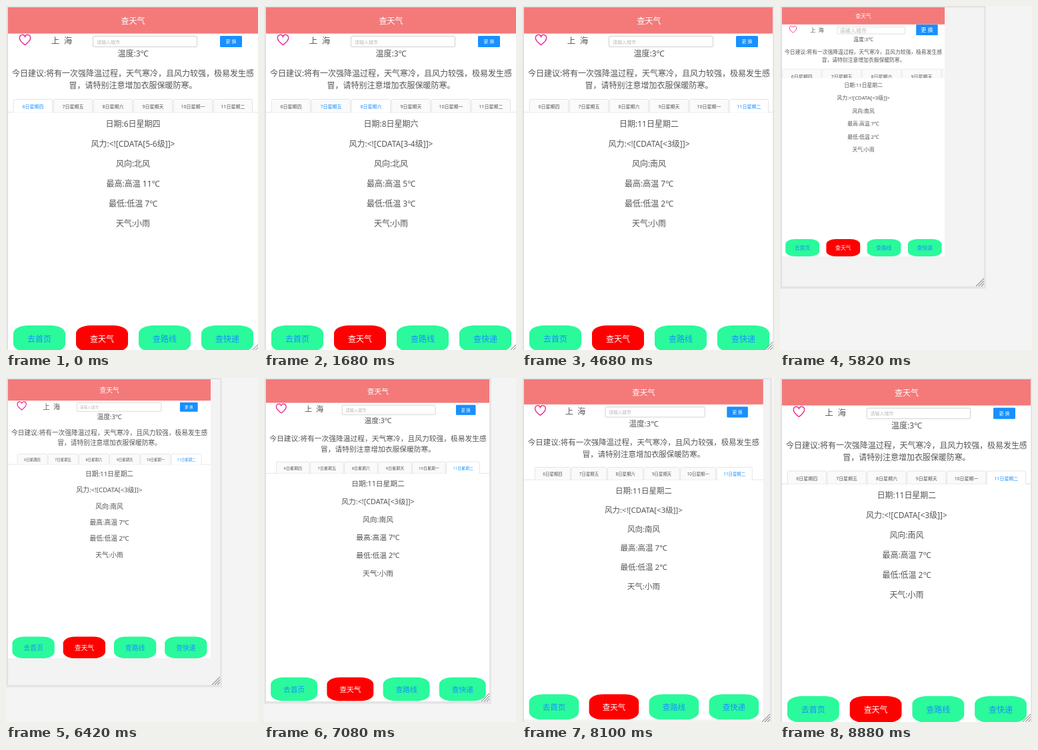
These frames come from a looping animation (378 by 518 pixels, 9.54 s). An HTML page:

```html
<!DOCTYPE html>
<html lang="zh-CN">
<head>
<meta charset="utf-8">
<title>查天气</title>
<style>
  html, body { margin: 0; width: 100%; height: 100%; overflow: hidden; background: #f4f4f4; }
  svg { display: block; }
  text { font-family: 'Noto Sans', 'Noto Sans CJK SC', 'Noto Sans CJK', sans-serif; white-space: pre; }
</style>
</head>
<body>
<svg id="stage" width="378" height="518" viewBox="0 0 378 518"></svg>
<script>
const LOOP = 9540, STEP = 60, FADE = 300;
const INK = '#555', BLUE = '#1890ff';
const stage = document.getElementById('stage');

const days = [
  { name: '6日星期四', wind: '5-6级', dir: '北风', hi: 11, lo: 7, sky: '小雨', on: -FADE, off: 960 },
  { name: '7日星期五', wind: '4-5级', dir: '北风', hi: 6, lo: 3, sky: '小雨', on: 440, off: 1680 },
  { name: '8日星期六', wind: '3-4级', dir: '北风', hi: 5, lo: 3, sky: '小雨', on: 1080, off: 2580 },
  { name: '9日星期天', wind: '<3级', dir: '北风', hi: 8, lo: 3, sky: '小雨', on: 1920, off: 2940 },
  { name: '10日星期一', wind: '<3级', dir: '南风', hi: 10, lo: 3, sky: '多云', on: 2600, off: 3600 },
  { name: '11日星期二', wind: '<3级', dir: '南风', hi: 7, lo: 2, sky: '小雨', on: 3080, off: Infinity }
];
const links = ['去首页', '查天气', '查路线', '查快递'];

// Resizable frame: time, right, bottom; a fourth value glides on to the next key
const frameKeys = [
  [0, 381, 521], [4680, 377, 519], [4980, 254, 379], [5520, 254, 379, 1],
  [5820, 307, 423, 1], [6180, 314, 439], [6420, 322, 463], [6840, 338, 488],
  [7020, 338, 488, 1], [7080, 339, 488, 1], [7380, 341, 493], [7560, 341, 493, 1],
  [8100, 373, 519, 1], [8280, 377, 519]
];
// Page lags behind the frame: time, scale, bottom
const pageKeys = [
  [0, 1, 521], [4980, .667, 378], [5280, .651, 377], [5940, .811, 422],
  [6660, .843, 448], [6840, .885, 481], [7080, .896, 486.5], [7380, .901, 492],
  [7860, .93, 505], [8040, .957, 514.5], [8580, .99, 518], [8700, .997, 519]
];

const clamp = v => Math.max(0, Math.min(1, v));
const keyAt = (keys, t) => keys.findLastIndex(k => k[0] <= t);

function frameAt(t) {
  const i = keyAt(frameKeys, t), [t0, r, b, glide] = frameKeys[i];
  if (!glide) return [r, b];
  const [t1, r1, b1] = frameKeys[i + 1], p = (t - t0) / (t1 - t0);
  return [Math.round(r + (r1 - r) * p), Math.round(b + (b1 - b) * p)];
}

function mixBlue(p) {
  const to = [24, 144, 255];
  return `rgb(${to.map(c => Math.round(85 + (c - 85) * p))})`;
}

const esc = s => s.replace(/&/g, '&amp;').replace(/</g, '&lt;').replace(/>/g, '&gt;');
const rect = (x, y, w, h, fill, more = '') =>
  `<rect x="${x}" y="${y}" width="${w}" height="${h}" fill="${fill}" ${more}/>`;
const text = (s, x, y, size = 12, fill = INK, anchor = 'middle') =>
  `<text x="${x}" y="${y + size * .37}" font-size="${size}" fill="${fill}" text-anchor="${anchor}">${esc(s)}</text>`;

function searchRow(small) {
  const dy = small ? 2 : 0, size = small ? 12.5 : 7;
  const [bx, by, bw, bh] = small ? [309, 40, 50, 24.5] : [318, 43, 33, 17];
  return `<path transform="translate(25.5 ${49 + dy})" d="M0 7.6C-4 4.6-8.2 1.4-8.2-2.8C-8.2-8.4-1.8-9.2 0-4.8C1.8-9.2 8.2-8.4 8.2-2.8C8.2 1.4 4 4.6 0 7.6Z" fill="none" stroke="#eb2f96" stroke-width="1.5"/>`
    + text('上\u00a0\u00a0海', 80.5, 50.5 + dy, 12.5)
    + rect(127.5, 43.5 + dy, 156, 16, '#fff', 'stroke="#d0d0d0" rx="1.5"')
    + text('请输入城市', 133, 52 + dy, size, '#b8b8b8', 'start')
    + rect(bx, by, bw, bh, BLUE, 'rx="1.5"')
    + text('更 换', bx + bw / 2, by + bh / 2 + .3, size, '#fff');
}

function tabRow(t, active, small) {
  const gap = small ? 92 : t >= 4980 && t < 8880 ? 57 : 60;
  const left = small ? .5 : 187.5 - (gap * 6 - 1.4) / 2;
  const top = small ? 143 : 138.5, base = small ? 163 : 158;
  const size = small ? 10.75 : gap === 57 ? 6.7 : 7;
  const w = gap - 1.6, h = base - top;
  let out = `<path d="M0 ${base}H375" stroke="#e2e2e2"/>`;
  days.forEach((d, i) => {
    const x = left + i * gap, on = i === active;
    const lit = clamp((t - d.on) / FADE) * (1 - clamp((t - d.off) / FADE));
    out += `<path d="M${x} ${base + (on ? .6 : 0)}V${top + 2}q0-2 2-2h${w - 4}q2 0 2 2V${base + (on ? .6 : 0)}" fill="${on ? '#fff' : '#fafafa'}" stroke="#e4e4e4"/>`
      + text(d.name, x + w / 2, small ? base - 3 : base - 8.5, size, mixBlue(lit));
  });
  return small ? out + rect(0, base + .5, 375, 14, '#fff') : out;
}

function details(d, dy) {
  return [
    `日期:${d.name}`, `风力:<![CDATA[${d.wind}]]>`, `风向:${d.dir}`,
    `最高:高温 ${d.hi}℃`, `最低:低温 ${d.lo}℃`, `天气:${d.sky}`
  ].map((s, i) => text(s, 187.5, 175.5 + dy + 30 * i)).join('');
}

function navBar(bottom) {
  return links.map((s, i) => {
    const x = 8 + 94 * i, here = i === 1;
    return rect(x, bottom - 40, 78, 40, here ? '#f00' : '#2afa9b', 'rx="22" ry="12"')
      + text(s, x + 39, bottom - 19.5, 12, here ? '#fff' : BLUE);
  }).join('');
}

function page(t, right) {
  const [, s, bottom] = pageKeys[keyAt(pageKeys, t)];
  const small = s < .7, dy = small ? 4 : 0;
  const active = days.findIndex(d => t < d.off);
  return `<svg x="3" y="2" width="${Math.min(375 * s, right - 4)}" height="${bottom - 2}" overflow="hidden">`
    + rect(0, 0, '100%', '100%', '#fff')
    + `<g transform="scale(${s})">`
    + rect(0, 0, 375, 39.5, '#f47a7a')
    + text('查天气', 187.5, 20.5, 12, '#fff')
    + searchRow(small)
    + text('温度:3℃', 187.5, 69.5 + dy)
    + text('今日建议:将有一次强降温过程，天气寒冷，且风力较强，极易发生感', 187.5, 99.5 + dy)
    + text('冒，请特别注意增加衣服保暖防寒。', 187.5, 117.5 + dy)
    + tabRow(t, active, small)
    + details(days[active], dy)
    + navBar((bottom - 2) / s)
    + '</g></svg>';
}

function draw(t) {
  const [r, b] = frameAt(t);
  const grip = [4, 8, 12].map(k => `M${r - k - 1} ${b - 1}L${r - 1} ${b - k - 1}`).join('');
  stage.innerHTML = rect(0, 0, 378, 518, '#f4f4f4')
    + rect(1.5, 1.5, r - 1, b, 'none', 'stroke="#000" stroke-opacity=".05" stroke-width="3"')
    + rect(2.5, 1.5, r - 2.5, b - 1.5, '#f3f3f3', 'stroke="#dcdcdc"')
    + page(t, r)
    + `<path d="${grip}" stroke="#999" stroke-width="1.1"/>`;
}

const start = performance.now();
let shown = -1;
function tick() {
  const t = Math.floor((performance.now() - start) % LOOP / STEP) * STEP;
  if (t !== shown) draw(shown = t);
  requestAnimationFrame(tick);
}
tick();
</script>
</body>
</html>
```
